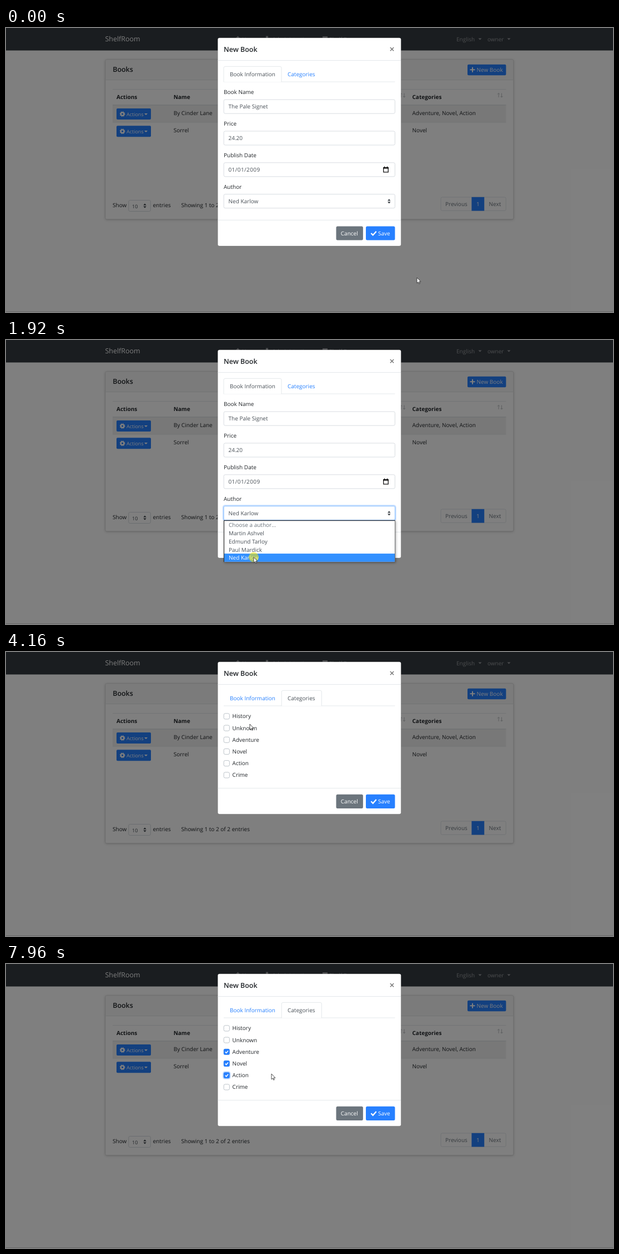
Animation, 1093 px wide and 512 px high, one loop 8000 ms. Source, as an HTML page:

```html
<!DOCTYPE html>
<html lang="en">
<head>
<meta charset="utf-8">
<title>New Book dialog</title>
<style>
html, body { margin: 0; width: 100%; height: 100%; overflow: hidden; background: #7f7f7f; }
svg { display: block; width: 1093px; height: 512px; }
text { font: 10px "Open Sans", "Noto Sans", sans-serif; fill: #212529; text-rendering: geometricPrecision; white-space: pre; }
.title { font-size: 12.45px; font-weight: 600; }
.brand { font-size: 12.45px; fill: #fff; }
.bold { font-weight: 700; }
.small { font-size: 9px; }
.nav { fill: #999c9f; }
.white { fill: #fff; }
.value { fill: #495057; }
.muted { fill: #6c757d; }
.date { fill: #495057; letter-spacing: .4px; }
.blue { fill: #2780ff; }
.line { fill: none; stroke: #dee2e6; stroke-width: .8; }
.field { fill: #fff; stroke: #ced4da; stroke-width: .8; }
.ring { fill: none; stroke: #2780ff; stroke-opacity: .28; stroke-width: 2.1; }
.tick { fill: none; stroke: #fff; }
</style>
</head>
<body>
<svg id="stage" viewBox="0 0 1093 512"></svg>
<script>
const BLUE = '#2780ff';
const categories = ['History', 'Unknown', 'Adventure', 'Novel', 'Action', 'Crime'];
const authors = ['Choose a author...', 'Martin Ashvel', 'Edmund Tarloy', 'Paul Mardick', 'Ned Karlow'];
const fields = [['Book Name', 'The Pale Signet'], ['Price', '24.20'], ['Publish Date', '01/01/2009'], ['Author', 'Ned Karlow']];

// y is the middle of the capitals
const text = (x, y, s, cls = '') =>
  `<text x="${x}" y="${y + (/title|brand/.test(cls) ? 4.5 : 3.6)}" class="${cls}">${s}</text>`;
const box = (x, y, w, h, attrs = '', r = 2.5) =>
  `<rect x="${x}" y="${y}" width="${w}" height="${h}" rx="${r}" ${attrs}/>`;
const path = (d, attrs = '') => `<path d="${d}" ${attrs}/>`;
const group = (id, body) => `<g id="${id}">${body}</g>`;
const caret = (x, y, fill) => path(`M${x} ${y}h6l-3 3z`, `fill="${fill}"`);
const spinner = (x, y) => path(`M${x - 2.7} ${y - .9}h5.4l-2.7-3.2zM${x - 2.7} ${y + .9}h5.4l-2.7 3.2z`, 'fill="#343a40"');
const sortMark = x => path(`M${x} 125v-7.5m-2 2l2-2 2 2M${x + 5.5} 117.5v7.5m-2-2l2 2 2-2`, 'fill="none" stroke="#b4b7ba" stroke-width=".9"');
const tabShape = (x, w) => `M${x} 97.3V72q0-2.6 2.6-2.6H${x + w - 2.6}q2.6 0 2.6 2.6V97.3`;
const firstTab = tabShape(392, 104), secondTab = tabShape(496.2, 72.2);

function actionRow(y, name, list) {
  return box(199, y - 8.3, 62, 20, `fill="${BLUE}"`, 2)
    + `<circle cx="209.6" cy="${y + 1.8}" r="2.8" fill="none" stroke="#fff" stroke-width="2.2"/>`
    + `<circle cx="209.6" cy="${y + 1.8}" r="4.2" fill="none" stroke="#fff" stroke-width="1.3" stroke-dasharray="1.7 1.6"/>`
    + text(217, y + 1.9, 'Actions', 'white small') + caret(249, y + .6, '#fff')
    + text(301.7, y, name) + text(731.5, y, list);
}

const page = box(0, 0, 1093, 512, 'fill="#fff"', 0)
  + box(0, 0, 1093, 40.5, 'fill="#343a40"', 0)
  + text(178.5, 19.8, 'ShelfRoom', 'brand')
  + path('M412.5 19.5l5-5 5 5v5h-10zM468 14.5h4v3l4 6-2 2-6-7zM570 15h9v10h-9z', 'fill="#999c9f"')
  + text(425, 20, 'Home', 'nav') + text(479.5, 20, 'Administration', 'nav') + text(582, 20, 'Shelf Room', 'nav')
  + text(811, 20, 'English', 'nav') + caret(850.5, 18.5, '#999c9f')
  + text(867, 20, 'owner', 'nav') + caret(902.5, 18.5, '#999c9f')
  + box(178.8, 56.8, 735, 288, 'fill="#fff" stroke="#000" stroke-opacity=".13" stroke-width=".8" style="filter:drop-shadow(0 1.5px 2px #0003)"')
  + box(179, 57, 734.6, 36.4, 'fill="#000" fill-opacity=".03"')
  + path('M179 93.6H913.6', 'class="line"')
  + text(192.2, 74, 'Books', 'title')
  + box(831, 65.8, 69.4, 19.4, `fill="${BLUE}"`, 2)
  + path('M835.5 75.2h9M840 70.7v9', 'stroke="#fff" stroke-width="2"')
  + text(847.5, 75.4, 'New Book', 'white')
  + box(192, 139, 708.4, 31, 'fill="#000" fill-opacity=".05"', 0)
  + path('M192 110.6H900.4M192 170H900.4', 'class="line"')
  + path('M192 138.8H900.4', 'class="line" style="stroke-width:1.3"')
  + text(199, 124.8, 'Actions', 'bold') + text(301.7, 124.8, 'Name', 'bold') + text(731.5, 124.8, 'Categories', 'bold')
  + sortMark(711.5) + sortMark(887)
  + actionRow(153.3, 'By Cinder Lane', 'Adventure, Novel, Action')
  + actionRow(184.5, 'Sorrel', 'Novel')
  + text(192, 319.6, 'Show') + box(220.8, 310.5, 39.6, 20, 'class="field"')
  + text(227, 321, '10', 'value small') + spinner(250, 320.5) + text(264.5, 319.6, 'entries')
  + text(315.5, 319.6, 'Showing 1 to 2 of 2 entries')
  + box(783, 305, 117.2, 24.4, 'class="line"')
  + box(838.4, 304.8, 22.8, 24.8, `fill="${BLUE}"`, 0)
  + text(791, 317.8, 'Previous', 'muted') + text(847, 317.8, '1', 'white') + text(869.5, 317.8, 'Next', 'muted')
  + box(0, 0, 1093, 512, 'fill-opacity=".5"', 0);

const infoPane = fields.map(([label, value], i) => {
  const y = 115.8 + 56.85 * i;
  return text(392, y, label) + box(392.2, y + 13.3, 308.2, 25.1, `class="field" id="field${i}"`)
    + text(400.5, y + 26, value, i === 2 ? 'date' : 'value');
}).join('')
  + path('M679.8 251.8h8.4v8h-8.4z', 'fill="none" stroke="#111" stroke-width="1.3"')
  + path('M679.2 251h9.6v2.6h-9.6zM681 249.5h1.3v2h-1.3zM685.8 249.5h1.3v2h-1.3z', 'fill="#111"')
  + spinner(689.8, 312.3)
  + box(391, 298.2, 310.6, 27.4, 'class="ring" id="selectRing"', 3.5);

const categoryPane = categories.map((name, i) => {
  const y = 115.8 + 21.2 * i;
  return box(392.2, y - 5, 10.2, 10.2, 'fill="#fff" stroke="#adb5bd" stroke-width=".8"')
    + group('check' + i, box(391.9, y - 5.3, 10.8, 10.8, `fill="${BLUE}"`)
      + path(`M394.7 ${y + .2}l2 2 3.3-4`, 'class="tick" stroke-width="1.5"'))
    + box(391, y - 6.2, 12.6, 12.6, `class="ring" id="ring${i}"`, 3.4)
    + text(407.6, y, name);
}).join('');

const footer = path('M381.5 346.3H711', 'class="line"')
  + box(594.5, 357.4, 48.4, 25.2, 'fill="#6c757d"') + text(602.8, 370.2, 'Cancel', 'white')
  + box(648, 357.4, 52.4, 25.2, `fill="${BLUE}"`)
  + path('M657.4 370l3.3 3.4 6-6.7', 'class="tick" stroke-width="2.3"') + text(670, 370.2, 'Save', 'white');

const modal = box(381.3, 17.7, 330, 375.3, 'id="dialog" fill="#fff" stroke="#000" stroke-opacity=".2" stroke-width=".7"', 3.2)
  + path('M381.5 58.5H711M392 97H700.4', 'class="line"')
  + text(392, 38.4, 'New Book', 'title')
  + path('M691.9 35l6.2 6.2m0-6.2l-6.2 6.2', 'stroke="#777" stroke-width="1.5"')
  + path(secondTab, 'id="hoverTab" class="line"')
  + path(firstTab, 'id="activeTab" class="line" style="fill:#fff"')
  + group('infoLabel', text(403, 83.8, 'Book Information')) + group('categoryLabel', text(507, 83.8, 'Categories'))
  + group('info', infoPane) + group('categories', categoryPane) + group('footer', footer);

const dropdown = box(392.5, 325.5, 308, 74.6, 'fill="#fff" stroke="#555" stroke-width=".8" style="filter:drop-shadow(1px 1px 2px #0006)"', 0)
  + path('M392.6 400V325.6H700.4', 'fill="none" stroke="#222"')
  + box(393, 0, 307, 14.7, 'fill="#3390ff" id="highlight"', 0)
  + authors.map((name, i) => group('option' + i, text(401, 333.8 + 14.7 * i, name))).join('');

const pointer = group('arrow', path('M0 0V10L2.3 8 3.8 11.2 5.3 10.6 3.8 7.3H6.9Z', 'fill="#fff" stroke="#222" stroke-width=".8"'))
  + group('hand', path('M-1 1Q0-.8 1 1V5L5.4 6Q6.9 6.4 6.7 8L6 12H.6L-3 7.5Q-3 5.6-1 7.2Z', 'fill="#fff" stroke="#222" stroke-width=".8"')
    + path('M2.4 5.5v2M4.4 6v2', 'stroke="#222" stroke-width=".6"'));

const stage = document.getElementById('stage');
stage.innerHTML = page + modal + group('dropdown', dropdown)
  + '<circle id="pulse" r="9" fill="#ffeb00" fill-opacity=".55"/>' + group('pointer', pointer)
  + box(0, 511, 1093, 1, 'fill="#666"', 0) + box(0, 511, 249, 1, 'fill="#d5d7da" id="status"', 0);

const el = {};
stage.querySelectorAll('[id]').forEach(node => el[node.id] = node);
const show = (node, on) => node.style.opacity = +on;
const clamp = v => Math.max(0, Math.min(1, v));

// pointer stops: time, x, y
const stops = [
  [0, 740, 450], [70, 740, 450], [70, 704, 396], [330, 704, 396], [850, 498, 313],
  [1180, 498, 313], [1330, 467, 353], [1740, 446, 391.5], [2030, 446, 391.5], [2400, 550, 109],
  [2630, 550, 109], [2790, 526, 86], [3380, 526, 86], [3620, 472, 118], [3900, 472, 118],
  [4160, 439, 130], [4430, 430, 160], [4650, 433, 173], [4740, 433, 173], [5070, 427, 157],
  [5540, 427, 157], [5890, 419, 182], [6920, 419, 182], [7080, 419, 198], [7680, 419, 198], [7960, 478, 198]
];
const clicks = [1060, 1920, 2930, 5340, 6350, 7560];
const checkedAt = { 2: 5410, 3: 6420, 4: 7630 };

function pointerAt(t) {
  const next = stops.findIndex(s => s[0] > t);
  if (next < 0) return stops[stops.length - 1].slice(1);
  const [t0, x0, y0] = stops[next - 1], [t1, x1, y1] = stops[next];
  const p = (t - t0) / (t1 - t0), e = p * p * (3 - 2 * p);
  return [x0 + (x1 - x0) * e, y0 + (y1 - y0) * e];
}

function draw(t) {
  const [x, y] = pointerAt(t);
  const overTab = x > 496 && x < 568 && y > 69 && y < 97;
  el.pointer.setAttribute('transform', `translate(${x} ${y})`);
  show(el.arrow, !overTab);
  show(el.hand, overTab);

  const click = clicks.find(c => t >= c && t < c + 200);
  el.pulse.setAttribute('cx', x);
  el.pulse.setAttribute('cy', y);
  show(el.pulse, click ? clamp((200 - t + click) / 120) : 0);

  const open = t >= 1120 && t < 2000;
  const row = y < 326.3 ? 4 : Math.min(4, Math.floor((y - 326.3) / 14.7));
  show(el.dropdown, open);
  el.highlight.setAttribute('y', 326.3 + 14.7 * row);
  authors.forEach((_, i) => el['option' + i].firstChild.setAttribute('class', i === row ? 'white' : i ? 'value' : 'muted'));

  const focused = t >= 1120 && t < 3060;
  show(el.selectRing, focused);
  el.field3.style.stroke = focused ? '#80bdff' : t >= 3060 ? '#a5cdf5' : '';

  const tabbed = t >= 3060, swapped = t >= 3350;
  el.activeTab.setAttribute('d', tabbed ? secondTab : firstTab);
  el.infoLabel.firstChild.setAttribute('class', tabbed ? 'blue' : 'value');
  el.categoryLabel.firstChild.setAttribute('class', tabbed ? 'value' : 'blue');
  show(el.hoverTab, overTab && !tabbed);
  show(el.info, swapped ? 0 : 1 - clamp((t - 3200) / 150));
  show(el.categories, clamp((t - 3350) / 150));
  el.dialog.setAttribute('height', swapped ? 274.6 : 375.3);
  el.footer.setAttribute('transform', `translate(0 ${swapped ? -100.7 : 0})`);
  show(el.status, t >= 2930 && t < 3750);

  const last = Object.keys(checkedAt).filter(i => t >= checkedAt[i]).pop();
  categories.forEach((_, i) => {
    show(el['check' + i], t >= checkedAt[i]);
    show(el['ring' + i], i === +last);
  });
}

function frame() {
  draw(performance.now() % 8000);
  requestAnimationFrame(frame);
}
frame();
</script>
</body>
</html>
```
